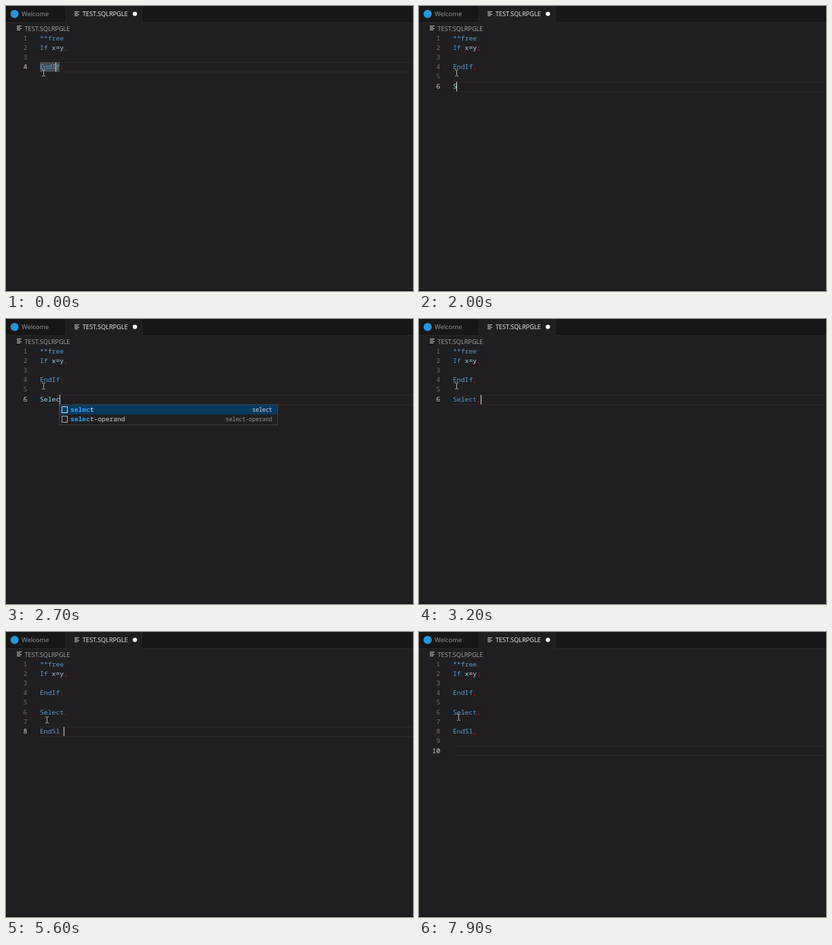
Write an HTML page with a canvas that moves like this. It is 600 px wide and 421 px high and loops after 8000 ms.

```html
<!DOCTYPE html>
<html lang="en">
<head>
<meta charset="utf-8">
<title>Editor snippets</title>
<style>
  html, body { margin: 0; width: 100%; height: 100%; overflow: hidden; background: #201e20; }
  canvas { display: block; width: 600px; height: 421px; }
</style>
</head>
<body>
<canvas id="stage" width="600" height="421"></canvas>
<script>
const ctx = document.getElementById('stage').getContext('2d');
const LOOP = 8000, LEFT = 50, CHAR = 5.86, ROW = 14.22, FIRST = 47.7;
const MONO = '"Noto Sans Mono", "DejaVu Sans Mono", monospace';
const UI = '"Open Sans", "Noto Sans", sans-serif';
const CODE = '9.77px ' + MONO, ITEM = '9.6px ' + MONO, ITEM_CHAR = 5.76;
const BLUE = '#569cd6', PALE = '#9cdcfe', RED = '#f0000c', GREY = '#d4d4d4';
const PAGE = '#201e20', BAR = '#181718', EDGE = '#2a282b';

// Each step holds from its time until the next one.
const steps = [
  { at: 0, row: 4, col: 4, mark: true },
  { at: 300, row: 4, col: 6 },
  { at: 800, row: 5, col: 0 },
  { at: 1200, row: 6, col: 0 },
  { at: 2000, row: 6, col: 1, typed: 'S' },
  { at: 2200, row: 6, col: 2, typed: 'Se', popup: true },
  { at: 2300, row: 6, col: 3, typed: 'Sel', popup: true },
  { at: 2500, row: 6, col: 4, typed: 'Sele', popup: true },
  { at: 2600, row: 6, col: 5, typed: 'Selec', popup: true },
  { at: 2800, row: 6, col: 6, typed: 'Select', popup: true },
  { at: 3000, row: 6, col: 7, done: true },
  { at: 3800, row: 7, col: 4, done: true, closed: true },
  { at: 4900, row: 8, col: 4, done: true, closed: true, mark: true },
  { at: 5300, row: 8, col: 6, done: true, closed: true },
  { at: 5800, row: 9, col: 0, done: true, closed: true },
  { at: 6100, row: 10, col: 0, done: true, closed: true },
  { at: 6700, row: 10, col: 0, done: true, closed: true, blink: true }
];

const pointer = [[0, 55, 99], [3900, 55, 99], [4300, 60, 130], [7300, 60, 130], [7600, 58, 126], [LOOP, 58, 126]];

const rowY = n => FIRST + (n - 1) * ROW;
const baseline = n => Math.round(rowY(n) + 2.9);
const colX = c => LEFT + c * CHAR;

function rect(x, y, w, h, color) {
  ctx.fillStyle = color;
  ctx.fillRect(x, y, w, h);
}

function text(str, x, y, color, font, align = 'left') {
  ctx.font = font;
  ctx.textAlign = align;
  ctx.fillStyle = color;
  ctx.fillText(str, x, y);
}

function dot(x, y, r, color) {
  ctx.fillStyle = color;
  ctx.beginPath();
  ctx.arc(x, y, r, 0, Math.PI * 2);
  ctx.fill();
}

function code(row, ...parts) {
  let col = 0;
  for (const [str, color] of parts) {
    text(str, colX(col), baseline(row), color, CODE);
    col += str.length;
  }
}

function listIcon(x, y, color) {
  [7, 5, 7, 5].forEach((w, i) => rect(x, y + i * 2, w, 1, color));
}

function chrome() {
  rect(0, 0, 600, 421, PAGE);
  rect(0, 0, 600, 24, BAR);
  rect(0, 24, 600, 1, EDGE);
  rect(89, 0, 111, 25, PAGE);
  rect(88, 0, 1, 24, EDGE);
  rect(200, 0, 1, 24, EDGE);
  rect(0, 420, 600, 1, '#101010');
  dot(12.7, 11.7, 6, '#2596dc');
  text('Welcome', 23, 15, '#9b9b9b', '9.4px ' + UI);
  listIcon(101, 8, '#c5c5c5');
  text('TEST.SQLRPGLE', 112.7, 15, '#f2f2f2', '9.2px ' + UI);
  dot(190, 11.6, 3.2, '#ffffff');
  listIcon(16, 29, '#c0c0c0');
  text('TEST.SQLRPGLE', 27.5, 36.5, '#a5a5a5', '9.2px ' + UI);
}

function popup(col, typed) {
  const x = Math.floor(colX(col)) - 1, y = 126, prefix = typed.toLowerCase();
  rect(x, y, 323, 31, '#424143');
  rect(x + 1, y + 1, 321, 29, '#201f21');
  rect(x + 1, y + 1, 321, 14, '#073a5f');
  ['select', 'select-operand'].forEach((name, i) => {
    const base = y + 11 + i * 14, tx = x + 17;
    ctx.strokeStyle = i ? '#b0b0b0' : '#d8d8d8';
    ctx.lineWidth = 1;
    ctx.strokeRect(x + 4.5, base - 7.5, 8, 9);
    text(prefix, tx, base, '#2aaaff', 'bold ' + ITEM);
    text(name.slice(prefix.length), tx + prefix.length * ITEM_CHAR, base, i ? '#d4d4d4' : '#ffffff', ITEM);
    text(name, x + 314.5, base, i ? '#969696' : '#dedede', '8.2px ' + MONO, 'right');
  });
}

function mouse(t) {
  const i = pointer.findIndex(p => p[0] > t);
  const [t0, x0, y0] = pointer[i - 1], [t1, x1, y1] = pointer[i];
  const k = (t - t0) / (t1 - t0), e = k * k * (3 - 2 * k);
  const x = Math.round(x0 + (x1 - x0) * e), y = Math.round(y0 + (y1 - y0) * e);
  const color = '#b0b0b0';
  for (const end of [y - 5, y + 4]) {
    rect(x - 2, end, 2, 1, color);
    rect(x + 1, end, 2, 1, color);
  }
  rect(x, y - 4, 1, 8, color);
}

function draw(t) {
  const s = steps.filter(p => p.at <= t).pop();
  const top = Math.round(rowY(s.row) - 7.2);
  chrome();
  rect(50, top, 550, 1, EDGE);
  rect(50, top + 14, 550, 1, EDGE);
  if (s.mark) rect(50, top, 29, 14, '#484a4d');

  const last = s.closed ? Math.max(8, s.row) : s.row;
  for (let n = 1; n <= last; n++) {
    text(n, 31.3, baseline(n), n === s.row ? '#d6d6d6' : '#6c7078', CODE, 'right');
  }

  code(1, ['**free', BLUE]);
  code(2, ['If ', BLUE], ['x', PALE], ['=', GREY], ['y', PALE], [';', RED]);
  code(4, ['EndIf', BLUE], [';', RED]);
  if (s.typed) code(6, [s.typed, PALE]);
  if (s.done) code(6, ['Select', BLUE], [';', RED]);
  if (s.closed) code(8, ['EndSl', BLUE], [';', RED]);

  if (!s.blink) rect(Math.floor(colX(s.col)), top, 1, 14, '#d8d8d8');
  if (s.popup) popup(s.col, s.typed);
  mouse(t);
}

const start = performance.now();
function tick() {
  draw((performance.now() - start) % LOOP);
  requestAnimationFrame(tick);
}
tick();
</script>
</body>
</html>
```
